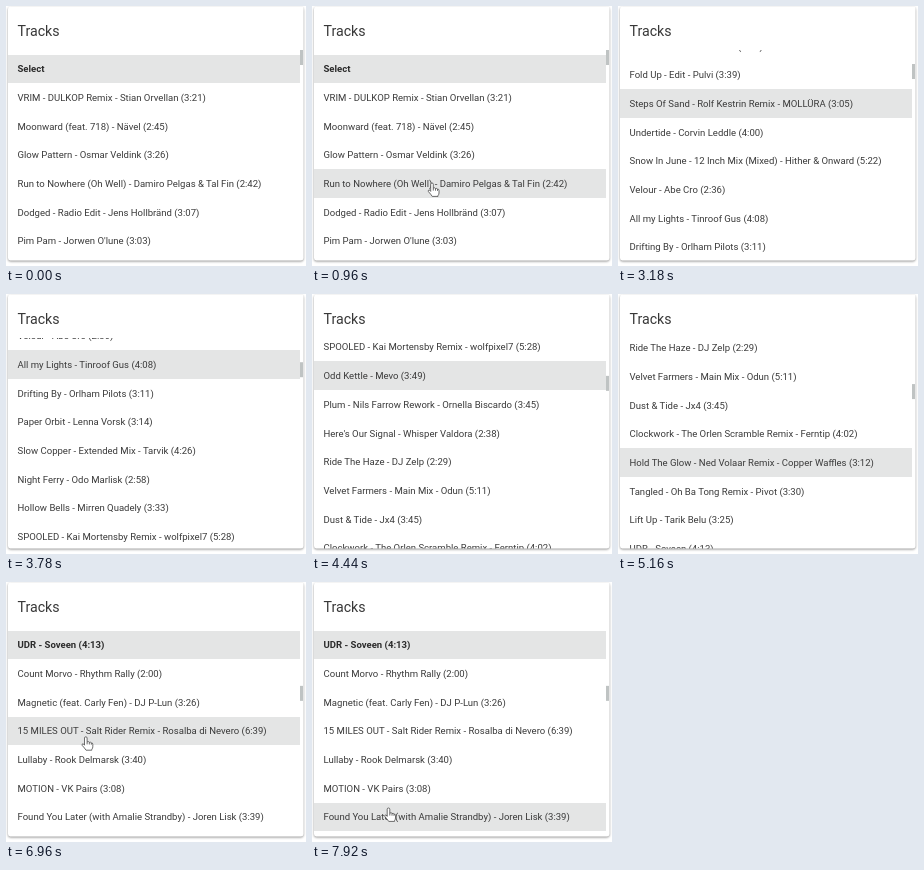
Animation of 300 by 260 pixels, one loop 8000 ms. Source, as an HTML page:

```html
<!DOCTYPE html>
<html lang="en">
<head>
<meta charset="utf-8">
<title>Tracks</title>
<style>
  html, body { margin: 0; width: 100%; height: 100%; overflow: hidden; background: #fff; }
  svg { display: block; width: 300px; height: 260px; }
  .card { fill: #fff; filter: drop-shadow(0 1px 1px rgba(0, 0, 0, .42)); }
  text { font-family: Roboto, Arial, sans-serif; font-size: 9.55px; fill: #3a3a3a; }
  .title { font-size: 14.2px; fill: #383838; }
  .bold { font-weight: 700; fill: #2b2b2b; }
  .band { fill: #e4e5e5; shape-rendering: crispEdges; }
  .thumb { fill: #bfc3c3; }
  .hand { fill: #fff; stroke: #4a4a4a; stroke-width: .8; stroke-linejoin: round; }
</style>
</head>
<body>
<svg viewBox="0 0 300 260">
  <clipPath id="view"><rect x="2" y="44" width="295" height="210.5"/></clipPath>
  <rect class="card" x="2" y="0.5" width="295.5" height="254" rx="2.4"/>
  <text class="title" x="11.5" y="30">Tracks</text>
  <g clip-path="url(#view)">
    <g id="list">
      <rect id="active" class="band" x="2" width="292"/>
      <rect id="hover" class="band" x="2" width="292"/>
    </g>
    <rect id="thumb" class="thumb" x="294" width="3" height="15"/>
  </g>
  <path id="hand" class="hand" d="M-1.3 8.4V1.2a1.3 1.2 0 0 1 2.6 0V5q1.8-.6 2.2.5 1.6-.4 2 .6 1.5-.2 1.5 1.4V10q0 1.4-1 2.6v.8H.2Q-1 11.4-3.6 8.6q-.6-1.6.8-1.6.8.2 1.5 1.4zM1.3 5v2.6M3.5 5.5v2.2M5.5 6.1v1.8"/>
</svg>
<script>
const LOOP = 8000, STEP = 60, ROW = 28.67, TOP = 48.7, PICK = 29;

const tracks = [
  "Select",
  "VRIM - DULKOP Remix - Stian Orvellan (3:21)",
  "Moonward (feat. 718) - Nävel (2:45)",
  "Glow Pattern - Osmar Veldink (3:26)",
  "Run to Nowhere (Oh Well) - Damiro Pelgas & Tal Fin (2:42)",
  "Dodged - Radio Edit - Jens Hollbränd (3:07)",
  "Pim Pam - Jorwen O'lune (3:03)",
  "Fold Up - Edit - Pulvi (3:39)",
  "Steps Of Sand - Rolf Kestrin Remix - MOLLÜRA (3:05)",
  "Undertide - Corvin Leddle (4:00)",
  "Snow In June - 12 Inch Mix (Mixed) - Hither & Onward (5:22)",
  "Velour - Abe Cro (2:36)",
  "All my Lights - Tinroof Gus (4:08)",
  "Drifting By - Orlham Pilots (3:11)",
  "Paper Orbit - Lenna Vorsk (3:14)",
  "Slow Copper - Extended Mix - Tarvik (4:26)",
  "Night Ferry - Odo Marlisk (2:58)",
  "Hollow Bells - Mirren Quadely (3:33)",
  "SPOOLED - Kai Mortensby Remix - wolfpixel7 (5:28)",
  "Odd Kettle - Mevo (3:49)",
  "Plum - Nils Farrow Rework - Ornella Biscardo (3:45)",
  "Here's Our Signal - Whisper Valdora (2:38)",
  "Ride The Haze - DJ Zelp (2:29)",
  "Velvet Farmers - Main Mix - Odun (5:11)",
  "Dust & Tide - Jx4 (3:45)",
  "Clockwork - The Orlen Scramble Remix - Ferntip (4:02)",
  "Hold The Glow - Ned Volaar Remix - Copper Waffles (3:12)",
  "Tangled - Oh Ba Tong Remix - Pivot (3:30)",
  "Lift Up - Tarik Belu (3:25)",
  "UDR - Soveen (4:13)",
  "Count Morvo - Rhythm Rally (2:00)",
  "Magnetic (feat. Carly Fen) - DJ P-Lun (3:26)",
  "15 MILES OUT - Salt Rider Remix - Rosalba di Nevero (6:39)",
  "Lullaby - Rook Delmarsk (3:40)",
  "MOTION - VK Pairs (3:08)",
  "Found You Later (with Amalie Strandby) - Joren Lisk (3:39)"
];

// [time, value...] keys
const scrollKeys = [
  [1740, 0], [2100, 38], [2460, 87], [2580, 106],
  [2760, 106], [3180, 194.7], [3420, 222],
  [3540, 222], [3840, 365], [4020, 425],
  [4140, 425], [4440, 526], [4620, 552],
  [4740, 552], [5100, 640], [5160, 640], [5400, 712], [5580, 741],
  [6660, 741], [6720, PICK * ROW]
];
const handKeys = [
  [600, 128, 262], [960, 120, 177], [5880, 120, 177],
  [6360, 80, 150], [6900, 80, 150], [7800, 77, 222], [7920, 76.5, 226]
];
// moments in the scrolling phase when the hovered row is refreshed
const rests = [1740, 2640, 3480, 4080, 4680, 5160, 5640];

const $ = id => document.getElementById(id);
const list = $("list"), active = $("active"), hover = $("hover"), thumb = $("thumb"), hand = $("hand");
const rowY = i => TOP + i * ROW;

active.setAttribute("height", ROW);
hover.setAttribute("height", ROW);

const rows = tracks.map((name, i) => {
  const el = document.createElementNS("http://www.w3.org/2000/svg", "text");
  el.textContent = name;
  el.setAttribute("x", 11.5);
  el.setAttribute("y", rowY(i) + ROW / 2 + 3.4);
  return list.appendChild(el);
});

function sample(keys, t) {
  if (t <= keys[0][0]) return keys[0].slice(1);
  const n = keys.findIndex(k => k[0] > t);
  if (n < 0) return keys[keys.length - 1].slice(1);
  const a = keys[n - 1], b = keys[n], p = (t - a[0]) / (b[0] - a[0]);
  return a.slice(1).map((v, i) => v + (b[i + 1] - v) * p);
}

function hoveredRow(t) {
  if (t < 660 || (t >= 6660 && t < 6960)) return -1;
  const live = t < 1800 || t >= 5940;
  const at = live ? t : rests.filter(r => r <= t).pop();
  const y = sample(handKeys, at)[1], s = sample(scrollKeys, at)[0];
  return Math.floor((y - TOP + s) / ROW);
}

function draw(time) {
  const t = Math.floor(time / STEP) * STEP;
  const [scroll] = sample(scrollKeys, t);
  const [x, y] = sample(handKeys, t);
  const picked = t < 6660 ? 0 : PICK;
  const over = hoveredRow(t);

  list.setAttribute("transform", `translate(0 ${-scroll})`);
  thumb.setAttribute("y", 44 + scroll * 0.072);
  active.setAttribute("y", rowY(picked));
  hover.setAttribute("y", rowY(over));
  hover.style.display = over < 0 ? "none" : "";
  rows.forEach((el, i) => el.classList.toggle("bold", i === picked));
  hand.setAttribute("transform", `translate(${x} ${y})`);
  hand.style.display = (t >= 660 && t < 2820) || t >= 5940 ? "" : "none";
}

const start = performance.now();
function tick() {
  draw((performance.now() - start) % LOOP);
  requestAnimationFrame(tick);
}
tick();
</script>
</body>
</html>
```
